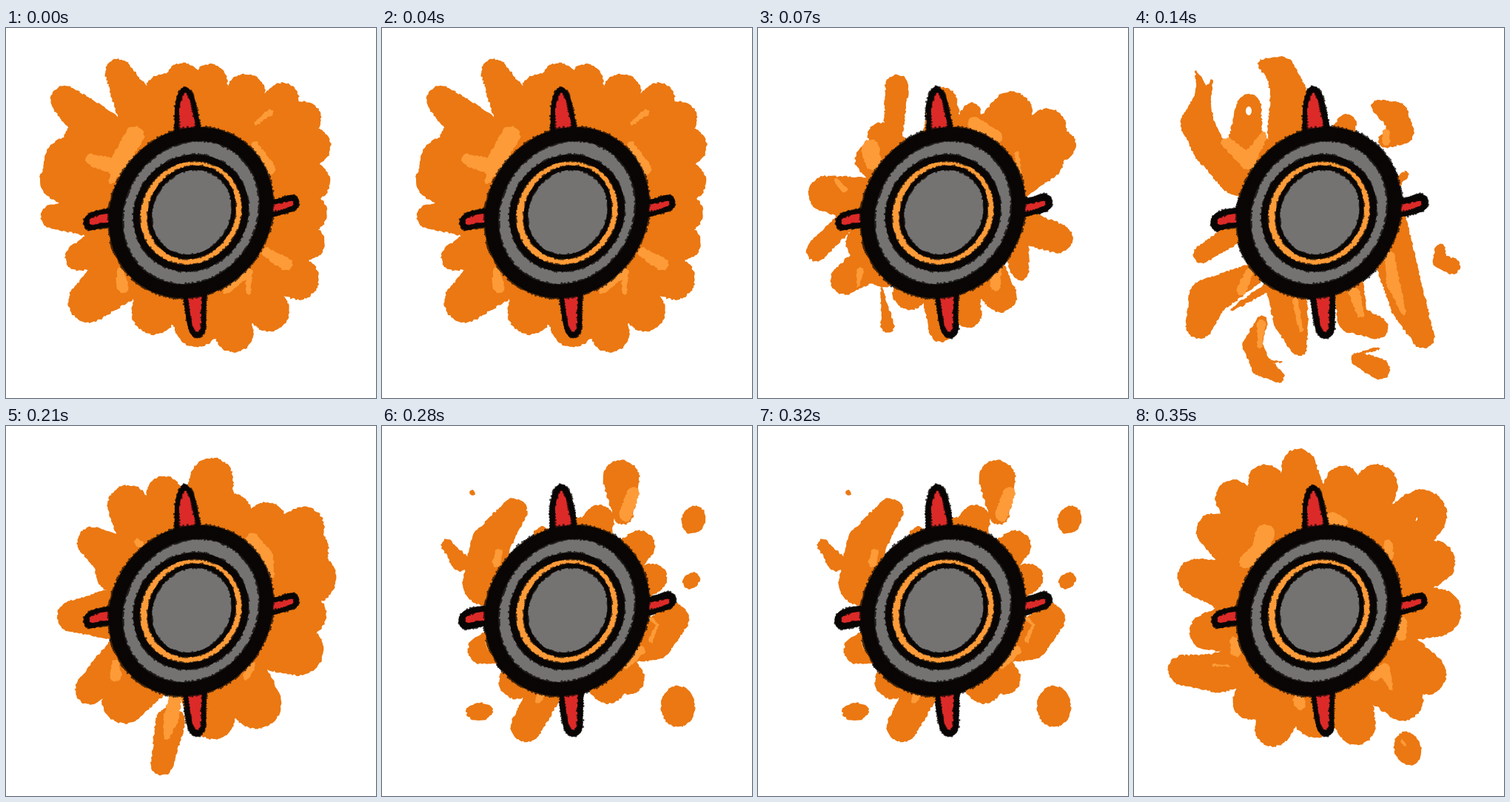
An HTML page with a canvas that plays this animation: 500x500 px, repeating every 0.42 s.

```html
<!DOCTYPE html>
<html lang="en">
<head>
<meta charset="utf-8">
<title>Burst</title>
<style>
html, body { margin: 0; width: 100%; height: 100%; overflow: hidden; background: #fff; }
canvas { display: block; width: 500px; height: 500px; }
</style>
</head>
<body>
<canvas id="stage" width="500" height="500"></canvas>
<script>
const ctx = document.getElementById('stage').getContext('2d');
const ORANGE = '#eb7812', LIGHT = '#fd9b38', GRAY = '#757372', RED = '#dc2a28', INK = '#0a0705';
const HOLD = 70, MID = 250, TAU = Math.PI * 2;

let seed = 1;
function rand() {
  seed = (seed * 16807) % 2147483647;
  return seed / 2147483647;
}
const jitter = r => (rand() * 2 - 1) * r;

function path(points, rough, closed) {
  ctx.beginPath();
  for (const [x, y] of points) ctx.lineTo(x + jitter(rough), y + jitter(rough));
  if (closed) ctx.closePath();
}

function fill(color, points, rough = 0) {
  ctx.fillStyle = color;
  path(points, rough, true);
  ctx.fill();
}

// Outline around two circles and the tangents joining them.
function hull(x1, y1, r1, x2, y2, r2) {
  const d = Math.hypot(x1 - x2, y1 - y2), dir = Math.atan2(y1 - y2, x1 - x2);
  const w = Math.acos(Math.max(-1, Math.min(1, (r2 - r1) / d)));
  const corners = [], out = [];
  const arc = (x, y, r, from, to) => {
    const n = Math.max(4, Math.ceil((to - from) * r / 2.4));
    for (let i = 0; i <= n; i++) {
      const a = from + (to - from) * i / n;
      corners.push([x + r * Math.cos(a), y + r * Math.sin(a)]);
    }
  };
  arc(x1, y1, r1, dir - w, dir + w);
  arc(x2, y2, r2, dir + w, dir + TAU - w);
  corners.forEach(([x, y], i) => {
    const [u, v] = corners[(i + 1) % corners.length];
    const n = Math.max(1, Math.round(Math.hypot(u - x, v - y) / 2.4));
    for (let j = 0; j < n; j++) out.push([x + (u - x) * j / n, y + (v - y) * j / n]);
  });
  return out;
}

function ellipse(x, y, rx, ry, deg = 0) {
  const n = Math.ceil((rx + ry) * Math.PI / 2.6), t = deg * TAU / 360;
  return Array.from({ length: n }, (_, i) => {
    const a = i / n * TAU, u = rx * Math.cos(a), v = ry * Math.sin(a);
    return [x + u * Math.cos(t) - v * Math.sin(t), y + u * Math.sin(t) + v * Math.cos(t)];
  });
}

// Smooth open curve through flat x,y pairs.
function curve(p) {
  const n = p.length / 2, out = [];
  const at = (i, k) => p[2 * Math.max(0, Math.min(n - 1, i)) + k];
  for (let i = 0; i < n - 1; i++) {
    for (let t = 0; t < 1; t += 0.125) {
      out.push([0, 1].map(k => {
        const a = at(i - 1, k), b = at(i, k), c = at(i + 1, k), d = at(i + 2, k);
        return b + 0.5 * t * (c - a + t * (2 * a - 5 * b + 4 * c - d + t * (3 * b - a - 3 * c + d)));
      }));
    }
  }
  out.push([at(n - 1, 0), at(n - 1, 1)]);
  return out;
}

// Trails and lobes take x, y, radius triples.
function streak(color, p) {
  for (let i = 0; i + 5 < p.length; i += 3) fill(color, hull(...p.slice(i, i + 6)), 1.2);
}
const trail = (...p) => streak(ORANGE, p);
const glow = (...p) => streak(LIGHT, p);
const oval = (...p) => fill(ORANGE, ellipse(...p), 1.2);
function lobes(base, ...p) {
  for (let i = 0; i < p.length; i += 3) trail(...p.slice(i, i + 3), MID, MID, base);
}

// Charcoal line: a solid core with ragged dabs across it.
function brush(points, width, closed) {
  ctx.lineCap = ctx.lineJoin = 'round';
  ctx.strokeStyle = INK;
  ctx.lineWidth = width * 0.86;
  path(points, 0.4, closed);
  ctx.stroke();
  ctx.lineWidth = 3;
  ctx.globalAlpha = 0.75;
  points.forEach(([x, y], i) => {
    const [u, v] = points[i + 1] || points[i - 1];
    const d = Math.hypot(u - x, v - y) || 1, nx = (y - v) / d, ny = (u - x) / d;
    const a = width / 2 - 1 + jitter(1.2), b = width / 2 - 1 + jitter(1.2);
    ctx.beginPath();
    ctx.moveTo(x + nx * a, y + ny * a);
    ctx.lineTo(x - nx * b, y - ny * b);
    ctx.stroke();
  });
  ctx.globalAlpha = 1;
}

const outer = ellipse(250, 249.5, 98, 110, 35);
const middle = ellipse(250, 250, 71, 77, 40);
const inner = ellipse(251, 249, 55, 62, 30);
const topFin = curve([231, 140, 231, 112, 235, 92, 242, 83, 250, 92, 256, 115, 261, 140]);
const lowFin = curve([242, 360, 246, 388, 251, 409, 258, 415, 266, 408, 267, 385, 268, 360]);
const leftFin = curve([141, 247, 123, 250, 110, 257, 109, 266, 114, 270, 126, 268, 143, 265]);
const rightFin = curve([357, 235, 372, 233, 384, 229, 391, 231, 392, 240, 382, 246, 357, 253]);
const fins = [topFin, lowFin, leftFin, rightFin];

// Heavier ink that only shows where no splat covers it.
function shadow() {
  fins.forEach(f => brush(f, 10));
  brush(outer, 23, true);
}

function core() {
  for (const f of fins) {
    fill(RED, f);
    brush(f, 7);
  }
  fill(GRAY, outer);
  brush(outer, 21, true);
  fill(LIGHT, middle);
  brush(middle, 10, true);
  fill(GRAY, inner);
  brush(inner, 6.5, true);
}

function blast() {
  lobes(60, 152, 60, 18, 80, 98, 20, 212, 86, 24, 239, 71, 24, 276, 72, 23, 324, 88, 26, 374, 96, 22,
    402, 123, 24, 414, 160, 25, 412, 208, 26, 407, 250, 27, 408, 290, 23, 395, 339, 28, 355, 382, 28,
    308, 412, 26, 258, 400, 31, 200, 384, 30, 112, 370, 28, 98, 310, 18, 63, 255, 16, 76, 205, 30,
    86, 182, 35, 108, 154, 30);
  glow(116, 178, 8, 148, 188, 11, 174, 146, 13);
  glow(142, 207, 4, 162, 172, 12);
  glow(339, 128, 3, 357, 114, 4);
  glow(336, 158, 5, 355, 190, 9);
  glow(352, 303, 6, 378, 319, 9);
  glow(297, 356, 4, 328, 330, 5, 328, 358, 3);
  glow(154, 328, 5, 158, 350, 8);
}

function scatter() {
  trail(188, 79, 16, 183, 140, 13);
  lobes(45, 166, 146, 18, 250, 99, 19, 288, 114, 13, 342, 115, 29, 391, 135, 26, 408, 158, 21, 388, 180, 25,
    328, 362, 22, 285, 388, 17, 248, 406, 18, 205, 358, 23, 118, 340, 20, 92, 224, 24, 152, 178, 21);
  trail(405, 284, 20, 345, 265, 24);
  trail(354, 329, 12, 345, 270, 22);
  trail(167, 350, 1, 175, 403, 9);
  trail(79, 301, 14, 130, 250, 14);
  trail(138, 290, 20, 170, 320, 30);
  glow(152, 163, 12, 156, 182, 11);
  glow(106, 206, 3, 117, 219, 4);
  glow(291, 128, 8, 319, 148, 11);
  glow(320, 328, 9, 321, 348, 7);
  glow(138, 328, 5, 135, 348, 2);
  glow(350, 170, 3, 352, 198, 4);
}

function flare() {
  trail(84, 58, 1, 94, 90, 10, 85, 130, 22, 102, 163, 22, 140, 200, 26, 180, 210, 30);
  trail(105, 71, 2, 96, 95, 7);
  trail(155, 107, 17, 150, 160, 24, 175, 180, 30);
  trail(174, 49, 7, 198, 59, 20, 209, 88, 24, 212, 140, 32);
  trail(92, 306, 12, 150, 268, 15);
  trail(88, 402, 18, 100, 365, 26, 165, 330, 14);
  trail(132, 381, 2, 180, 350, 6);
  trail(223, 432, 11, 212, 395, 23, 205, 345, 28);
  trail(172, 397, 8, 160, 430, 13, 172, 456, 14, 195, 471, 8);
  trail(175, 451, 3, 200, 451, 1);
  trail(328, 405, 15, 295, 392, 20, 290, 345, 20);
  trail(391, 418, 15, 371, 375, 24, 352, 310, 28, 335, 270, 35);
  trail(367, 197, 4, 340, 225, 10);
  trail(287, 129, 13, 275, 160, 20);
  trail(330, 106, 9, 353, 118, 18, 362, 141, 16, 340, 152, 10);
  trail(414, 299, 7, 413, 315, 9, 430, 322, 11);
  trail(303, 448, 10, 332, 461, 14);
  trail(310, 438, 2, 330, 433, 2);
  fill('#fff', ellipse(155, 112, 4, 6));
  glow(125, 155, 7, 154, 180, 11, 175, 146, 5);
  glow(341, 142, 5, 341, 154, 5);
  glow(172, 400, 6, 170, 430, 3);
  glow(156, 329, 5, 145, 354, 7);
  glow(298, 358, 8, 306, 386, 5);
  glow(345, 308, 7, 350, 345, 9, 365, 385, 3);
  glow(218, 368, 4, 226, 408, 3);
}

function bloom() {
  lobes(60, 278, 72, 29, 214, 92, 24, 165, 108, 28, 117, 157, 21, 150, 195, 30, 90, 257, 21, 113, 356, 20,
    160, 372, 30, 280, 393, 30, 338, 375, 34, 395, 303, 34, 405, 255, 28, 410, 205, 36, 402, 168, 34,
    402, 137, 28, 352, 130, 27, 305, 118, 27);
  trail(211, 457, 15, 222, 400, 20);
  glow(333, 155, 10, 347, 178, 14, 356, 200, 7);
  glow(148, 320, 4, 148, 337, 8);
  glow(229, 365, 9, 223, 395, 10, 217, 421, 4);
  glow(331, 324, 6, 325, 339, 4);
  glow(177, 156, 4, 181, 160, 5);
}

function shards() {
  trail(178, 116, 18, 146, 160, 26, 139, 212, 30, 190, 220, 40);
  trail(216, 147, 11, 225, 170, 20);
  trail(88, 161, 8, 106, 184, 12);
  oval(122, 90, 4, 4);
  trail(136, 302, 20, 180, 290, 30);
  lobes(40, 182, 345, 24, 305, 350, 25, 333, 341, 22, 365, 206, 20, 348, 162, 21, 293, 128, 21, 270, 141, 18);
  trail(195, 406, 21, 225, 350, 24);
  oval(132, 386, 18, 12, -5);
  trail(393, 261, 22, 368, 291, 25, 330, 290, 30);
  trail(323, 71, 25, 326, 119, 14);
  oval(421, 127, 16, 19, 20);
  oval(418, 209, 13, 10, -40);
  oval(400, 379, 23, 28);
  glow(340, 90, 8, 329, 120, 9);
  glow(158, 171, 5, 155, 185, 6);
  glow(361, 258, 2, 372, 269, 2, 363, 290, 3);
  glow(350, 303, 6, 329, 325, 3);
  glow(214, 366, 5, 210, 371, 4);
  glow(143, 293, 3, 144, 301, 2);
}

function cloud() {
  lobes(60, 223, 54, 23, 178, 76, 24, 135, 98, 25, 108, 142, 24, 84, 204, 25, 100, 278, 25, 158, 372, 25,
    188, 408, 25, 245, 391, 30, 300, 405, 26, 363, 370, 28, 394, 335, 28, 410, 252, 32, 405, 184, 29,
    388, 121, 35, 328, 80, 28, 282, 78, 24);
  trail(66, 330, 20, 115, 334, 26, 200, 300, 40);
  oval(370, 436, 18, 23, -20);
  fill('#fff', ellipse(382, 126, 1, 3, 20));
  glow(151, 184, 9, 170, 168, 12, 177, 146, 13);
  glow(268, 124, 8, 284, 130, 5);
  glow(343, 160, 6, 345, 176, 6);
  glow(135, 290, 5, 138, 304, 8);
  glow(325, 339, 6, 338, 329, 8, 347, 354, 3);
  glow(223, 371, 8, 225, 378, 6);
  glow(362, 265, 7, 361, 283, 7);
  glow(108, 323, 2, 129, 324, 1);
  glow(362, 426, 2, 366, 431, 2);
}

const bursts = [blast, scatter, flare, bloom, shards, cloud];

function draw(i) {
  ctx.fillStyle = '#fff';
  ctx.fillRect(0, 0, 500, 500);
  seed = 41;
  shadow();
  seed = 97 + i * 1013;
  bursts[i]();
  seed = 7;
  core();
}

const start = performance.now();
let shown = -1;
function tick() {
  const i = Math.floor((performance.now() - start) / HOLD) % bursts.length;
  if (i !== shown) draw(shown = i);
  requestAnimationFrame(tick);
}
tick();
</script>
</body>
</html>
```
